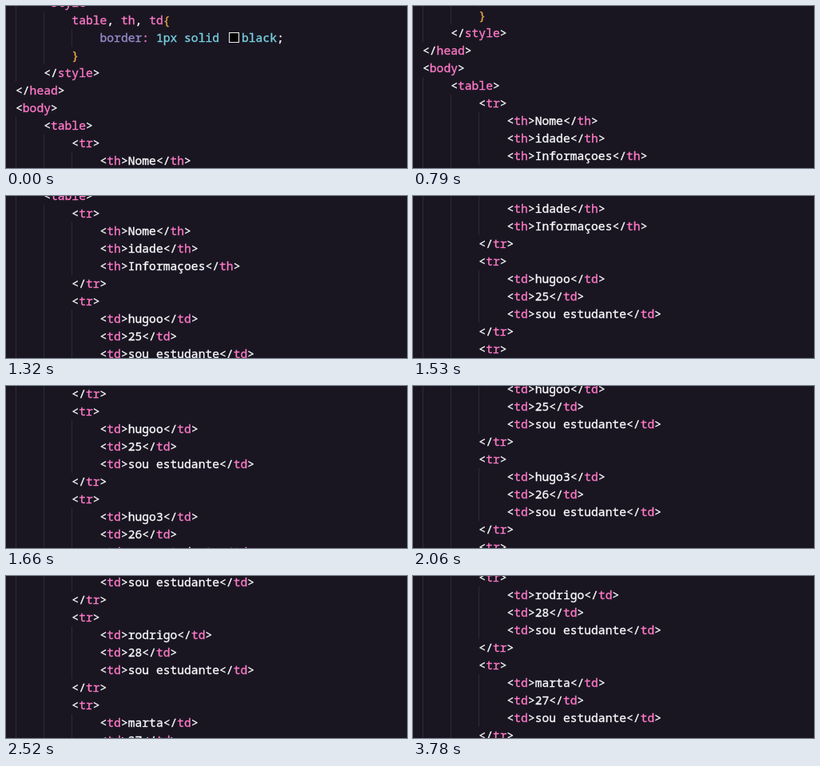
Write an HTML page that moves like this. It is 502 px wide and 203 px high and loops after 4510 ms.

```html
<!DOCTYPE html>
<html lang="pt">
<head>
<meta charset="utf-8">
<title>Code scroll</title>
<style>
  html, body { margin: 0; width: 100%; height: 100%; overflow: hidden; background: #191622; }
  #stage { position: relative; width: 502px; height: 203px; overflow: hidden; background: #191622; }
  #code {
    position: absolute; left: 12px; top: -15px;
    font: 14.66px/22px "Noto Sans Mono", "DejaVu Sans Mono", monospace;
    color: #fafafc;
    -webkit-text-stroke: 0.35px currentColor;
  }
  .line { position: relative; height: 22px; white-space: pre; }
  .text { position: relative; top: -1px; }
  .guide { position: absolute; top: 0; width: 1px; height: 22px; background: #2e2a39; }
  .tag { color: #ff79c6; }
  .prop { color: #988bc7; }
  .value { color: #78d1e1; }
  .brace { color: #e8a545; }
  .swatch {
    display: inline-block; box-sizing: border-box; width: 12.8px; height: 12.8px;
    margin: 0 3.2px; border: 1px solid #eee; background: #000; vertical-align: -1px;
  }
</style>
</head>
<body>
<div id="stage"><div id="code"></div></div>
<script>
  const LOOP = 4510;
  const SCROLL_STEP = 50;
  const scrollTimes = [0, 790, 860, 1320, 1530, 1660, 2060, 2120, 2390, 2520, 3780];
  const people = [["hugoo", 25], ["hugo3", 26], ["rodrigo", 28], ["marta", 27]];

  const span = (cls, text) => `<span class="${cls}">${text}</span>`;
  const open = name => "&lt;" + span("tag", name) + "&gt;";
  const close = name => "&lt;/" + span("tag", name) + "&gt;";
  const cell = (name, text) => [3, open(name) + text + close(name)];
  const row = cells => [[2, open("tr")], ...cells, [2, close("tr")]];

  // Each line is [indent level, markup].
  const lines = [
    [1, open("style")],
    [2, ["table", "th", "td"].map(s => span("tag", s)).join(", ") + span("brace", "{")],
    [3, span("prop", "border") + span("tag", ":") + " " + span("value", "1px solid") +
        " " + span("swatch", "") + span("value", "black") + ";"],
    [2, span("brace", "}")],
    [1, close("style")],
    [0, close("head")],
    [0, open("body")],
    [1, open("table")],
    ...row(["Nome", "idade", "Informaçoes"].map(t => cell("th", t))),
    ...people.flatMap(([name, age]) =>
      row([name, age, "sou estudante"].map(t => cell("td", t))))
  ];

  const guides = level => Array.from({ length: level },
    (_, i) => `<i class="guide" style="left:${i * 35}px"></i>`).join("");

  const code = document.getElementById("code");
  code.innerHTML = lines.map(([level, markup]) =>
    `<div class="line">${guides(level)}${span("text", "    ".repeat(level) + markup)}</div>`
  ).join("");

  const pose = i => `translateY(${-SCROLL_STEP * i}px)`;
  const frames = scrollTimes.map((time, i) =>
    ({ offset: time / LOOP, transform: pose(i), easing: "step-end" }));
  frames.push({ offset: 1, transform: pose(scrollTimes.length - 1) });
  code.animate(frames, { duration: LOOP, iterations: Infinity });
</script>
</body>
</html>
```
